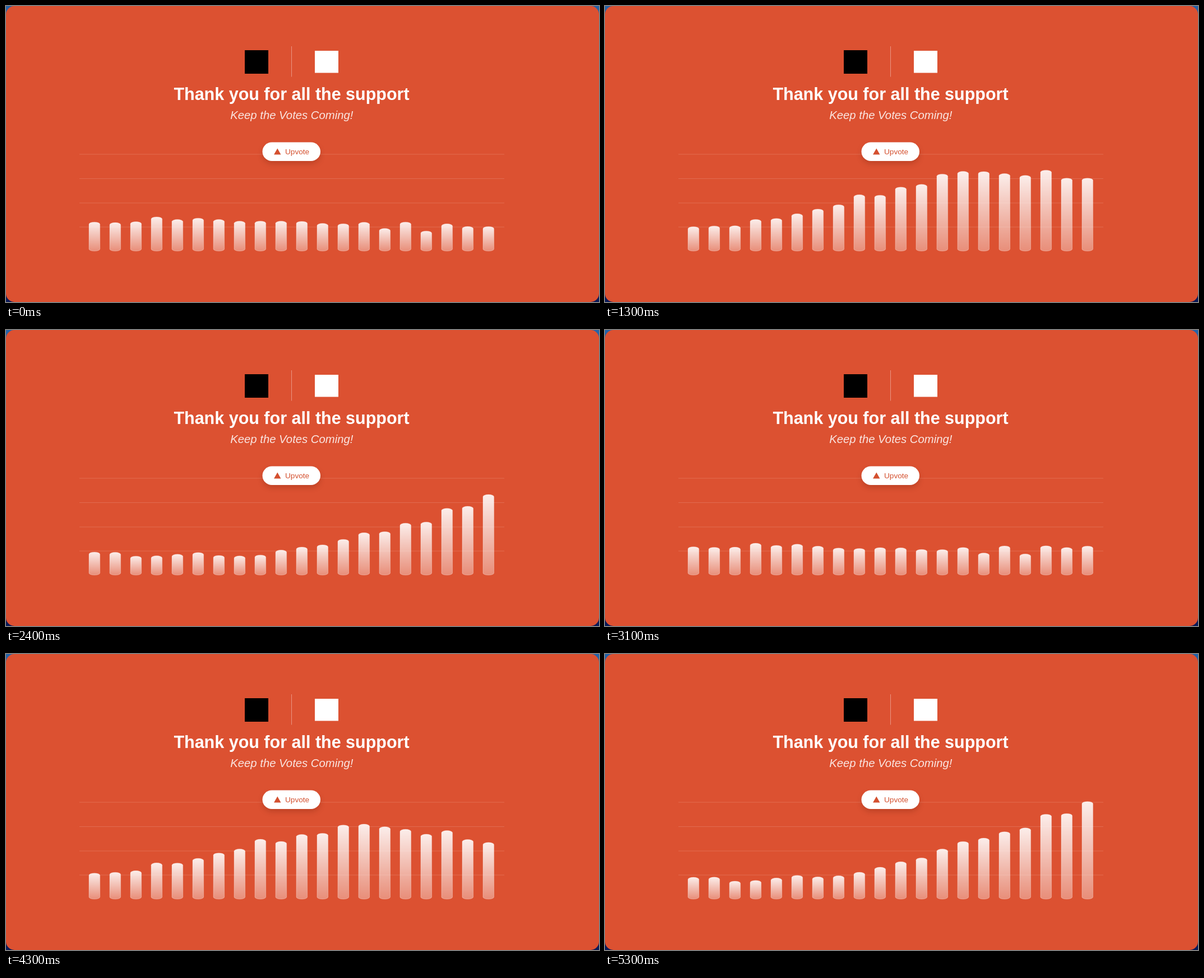
Animation of 1058x529 px, one loop 5400 ms. Source, as an HTML page:

```html
<!DOCTYPE html>
<html lang="en">
<head>
<meta charset="utf-8">
<title>Thank you</title>
<style>
  html, body { margin: 0; width: 100%; height: 100%; overflow: hidden; }
  body { background: linear-gradient(#2463a8 50%, #0a1a57 50%); }
  svg { display: block; }
  text { font-family: "Liberation Sans", Arial, sans-serif; text-anchor: middle; fill: #fff; }
  .button { filter: drop-shadow(0 5px 5px rgba(90, 20, 0, .22)); }
</style>
</head>
<body>
<svg width="1058" height="529" viewBox="0 0 1058 529">
  <defs>
    <linearGradient id="fill" x2="0" y2="1">
      <stop stop-color="#fff" stop-opacity=".9"/>
      <stop offset="1" stop-color="#fff" stop-opacity=".35"/>
    </linearGradient>
  </defs>
  <rect width="1058" height="529" rx="15" fill="#dc5131"/>

  <rect x="426" y="79" width="42" height="42"/>
  <path d="M509.5 72V126.500" stroke="#fff" stroke-opacity=".4"/>
  <rect x="551" y="80" width="42" height="39.500" fill="#fff"/>

  <text x="509.500" y="168" font-size="30.500" font-weight="700">Thank you for all the support</text>
  <text x="509.800" y="202" font-size="20.300" font-style="italic" fill-opacity=".86">Keep the Votes Coming!</text>

  <path d="M131 265H889M131 308.500H889M131 352H889M131 395H889" stroke="#fff" stroke-opacity=".15"/>
  <g id="bars" fill="url(#fill)" stroke="#fff" stroke-opacity=".3"></g>

  <rect class="button" x="457.500" y="243.500" width="103.500" height="33.500" rx="16.750" fill="#fff"/>
  <path d="M484.300 254.500L490.500 265.500H478Z" fill="#d4502f"/>
  <text x="519.600" y="265.300" font-size="13.600" style="fill:#d4502f">Upvote</text>
</svg>
<script>
  const LOOP = 5400, STEP = 100, WAVE = 3200, FLOOR = 438;
  // Resting level and swing of each bar, left to right
  const mids = [46.2, 46.4, 45.9, 54.2, 53.7, 58.8, 60.5, 62.5, 70.5, 71.8,
                79, 80.6, 90.5, 96.2, 92.9, 98.9, 93, 107.6, 101.3, 107];
  const swings = [7.5, 7.3, 13.9, 21.2, 16.9, 18.5, 25.5, 29, 37.2, 31.2,
                  36.8, 38.8, 47.2, 47.5, 53.5, 47.2, 57.5, 60.8, 62.1, 73.8];

  const group = document.getElementById('bars');
  const bars = mids.map((_, i) => {
    const bar = document.createElementNS('http://www.w3.org/2000/svg', 'rect');
    const attrs = { x: 148 + 37 * i, width: 19.6, rx: 9.8, ry: 3.8 };
    for (const name in attrs) bar.setAttribute(name, attrs[name]);
    return group.appendChild(bar);
  });

  // Each bar trails its left neighbour; the trough is slightly flatter than the crest.
  function barHeight(i, time) {
    const angle = time / WAVE * 2 * Math.PI - 0.69 - 0.16 * i;
    return mids[i] + swings[i] * (Math.cos(angle) - 0.08 * Math.sin(angle) ** 2);
  }

  function draw(now) {
    const time = Math.floor(now % LOOP / STEP) * STEP;
    bars.forEach((bar, i) => {
      const height = barHeight(i, time);
      bar.setAttribute('y', FLOOR - height);
      bar.setAttribute('height', height);
    });
  }

  const start = performance.now();
  function tick() {
    draw(performance.now() - start);
    requestAnimationFrame(tick);
  }
  tick();
</script>
</body>
</html>
```
